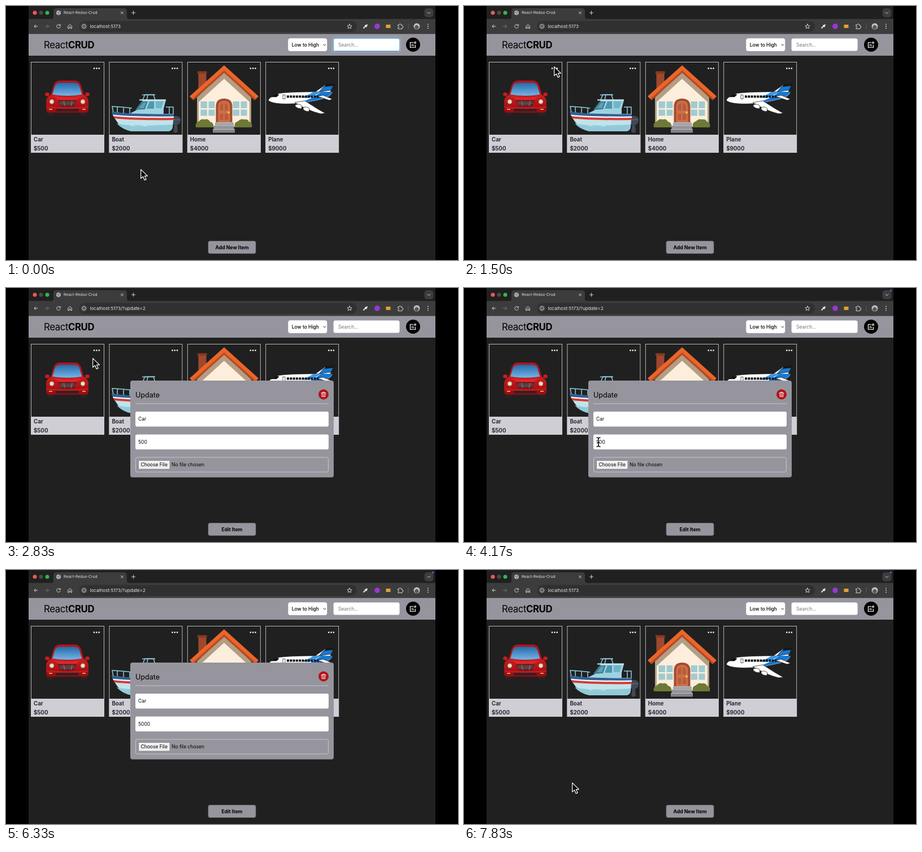
An HTML page that plays this animation: 800 by 450 pixels, repeating every 8 s.

```html
<!DOCTYPE html>
<html lang="en">
<head>
<meta charset="utf-8">
<title>React CRUD demo</title>
<style>
html, body { margin: 0; width: 100%; height: 100%; overflow: hidden; background: #000; }
svg { display: block; width: 100vw; height: 100vh; }
text { font-family: Inter, Roboto, sans-serif; font-size: 8.5px; white-space: pre; }
.label { font-size: 9.7px; font-weight: 700; fill: #2b2b36; }
.line { fill: none; stroke: #d2d3d5; stroke-width: 1; stroke-linecap: round; stroke-linejoin: round; }
.button { font-size: 8.7px; font-weight: 700; text-anchor: middle; }
</style>
</head>
<body>
<svg viewBox="0 0 800 450" xmlns="http://www.w3.org/2000/svg">
<defs>
  <linearGradient id="glass" x2="0" y2="1"><stop stop-color="#2569a8"/><stop offset="1" stop-color="#74b5e6"/></linearGradient>
  <linearGradient id="paint" x2="0" y2="1"><stop stop-color="#cf1c20"/><stop offset="1" stop-color="#970b11"/></linearGradient>
</defs>
<rect width="800" height="450"/>
<rect x="40" width="720" height="450" fill="#202020"/>

<g id="browser">
  <circle cx="51" cy="12" r="3.5" fill="#ee5a52"/><circle cx="62" cy="12" r="3.5" fill="#51484a"/><circle cx="73" cy="12" r="3.5" fill="#2fb944"/>
  <path d="M80 23Q84 23 84 19V9Q84 4 89 4H209Q214 4 214 9V19Q214 23 218 23H760V49.500H40V23Z" fill="#3c3c3c"/>
  <circle cx="93" cy="12" r="4" fill="#b9bcc0"/>
  <path d="M90 11q3 0 3 2t2 1M94 8.500q-1 2 2 3" fill="none" stroke="#4a4b4d"/>
  <text x="102" y="14.400" fill="#e3e3e3" style="font-size:6.750px">React-Redux-Crud</text>
  <path class="line" d="M203.500 10l4 4m0-4l-4 4M222.500 12h6m-3-3v6"/>
  <rect x="740.500" y="4" width="16" height="16" rx="5" fill="#3c3c3c"/>
  <path class="line" d="M746 11l2.500 2.500 2.500-2.500"/>
  <path class="line" d="M56 36H50m2.600-2.700L50 36l2.600 2.700"/>
  <path class="line" d="M69.500 36h6m-2.600-2.700L75.500 36l-2.600 2.700" style="stroke:#77787a"/>
  <path class="line" d="M95.800 34.200a3.300 3.300 0 1 0 .4 2.800M96.300 32.600v2.100h-2.100M110 35.500l3.200-2.800 3.200 2.800v4.200h-2v-2.600h-2.400v2.600h-2z"/>
  <rect x="129.500" y="26.500" width="491.500" height="19.500" rx="9.750" fill="#303030"/>
  <circle cx="138" cy="36" r="6.500" fill="#3c3c3c"/>
  <circle class="line" cx="138" cy="36" r="3.500"/><path class="line" d="M138 36v1.500m0-3.400v.1"/>
  <text id="url" x="148.500" y="39" fill="#e6e6e6" style="font-size:8.100px"></text>
  <path class="line" d="M608 32l1.200 2.700 2.900.3-2.200 1.900.7 2.900-2.600-1.500-2.600 1.500.7-2.900-2.200-1.900 2.900-.3z"/>
  <path d="M632.500 39.500l4.500-4.500" stroke="#d5e0ea" stroke-width="2"/><path d="M635.500 34l3 3m-1-2l2-2" stroke="#eee" stroke-width="2.200"/>
  <circle cx="657" cy="36" r="4.800" fill="#9a37d4"/>
  <rect x="672.500" y="33" width="8" height="6" fill="#dfa032"/>
  <path class="line" d="M694 33.500h2q0-2 1.500-2t1.500 2h2v2q2 0 2 1.500t-2 1.500v2h-7v-2.200q1.500-.1 1.500-1.400t-1.500-1.400z"/>
  <path d="M712 31v10" stroke="#5d5d5d"/>
  <circle cx="727" cy="36" r="5.500" fill="#bfc1c2"/><path d="M723 39q1-6 5-5l3 3q-2 5-5 4z" fill="#55595b"/>
  <path d="M747 32.500v.1m0 3.400v.1m0 3.400v.1" class="line" style="stroke-width:1.800"/>
</g>

<g id="header">
  <rect x="40" y="49.500" width="720" height="38.500" fill="#96959e"/>
  <text x="67" y="74.800" style="font-size:16.700px;letter-spacing:-.35px">React<tspan font-weight="700">CRUD</tspan></text>
  <rect x="499.300" y="57.300" width="69" height="22.700" rx="4" fill="#fff"/>
  <text x="505.800" y="71.800" font-weight="500">Low to High</text>
  <path d="M561.500 67.800l2.300 2.200 2.300-2.200" fill="none" stroke="#222"/>
  <g id="focus" fill="none">
    <rect x="578.700" y="56.700" width="118.600" height="23.600" rx="4.500" stroke="#c3d3e2" stroke-width="2.600"/>
    <rect x="579.200" y="57.200" width="117.600" height="22.600" rx="4" stroke="#2a71af" stroke-width="1.700"/>
  </g>
  <rect x="579.600" y="57.600" width="117" height="22" rx="3.700" fill="#fff"/>
  <text x="588" y="71.800" fill="#777">Search...</text>
  <circle cx="720.500" cy="68.500" r="12.500"/>
  <path d="M721 64.500h-5.500v9h9v-4.500M717.500 68h4m-4 2.500h5M724 62.500v5m-2.500-2.500h5" fill="none" stroke="#fff" stroke-width="1.200"/>
</g>

<g id="cards"></g>

<g id="car">
  <path d="M73 184h12v7q0 3-3 3h-6q-3 0-3-3zM132 184h12v7q0 3-3 3h-6q-3 0-3-3z" fill="#2d2224"/>
  <path d="M78 161l6-20q3-9 12-9h25q9 0 12 9l6 20z" fill="#b4141a"/>
  <path d="M82 157l4.500-15q2-6 9.500-6h25q7 0 9 6l4.500 15q-26 4-52.500 0z" fill="url(#glass)"/>
  <path d="M71 168q2-10 11-11 26 5 53 0 9 1 11 11v15q0 6-6 6H77q-6 0-6-6z" fill="url(#paint)"/>
  <path d="M84 160q24 4 49 0l-9 6H93z" fill="#d9282b"/>
  <ellipse cx="73" cy="156.500" rx="3.800" ry="3.200" fill="#c81d23"/><ellipse cx="144" cy="156.500" rx="3.800" ry="3.200" fill="#c81d23"/>
  <g fill="#f3dfba" stroke="#8c6e66"><circle cx="81" cy="169.500" r="4"/><circle cx="136" cy="169.500" r="4"/></g>
  <path d="M92 167.500h33l-5 10H97z" fill="#3c1d22"/>
  <path d="M94 170h29m-27.500 2.500h26m-25 2.500h23M102 168l2 9m11 0l2-9" stroke="#b09c94" stroke-width=".7"/>
  <path d="M72 179q36 4 73 0" fill="none" stroke="#d94440" stroke-width=".8"/>
  <rect x="88" y="182" width="41" height="5" rx="2.500" fill="#3c1d22"/>
  <path d="M76 183h6m53 0h6" stroke="#e89a4e" stroke-width="1.800"/>
</g>

<g id="boat">
  <path d="M293 198q2-4 10-3 6 1 6 7t-4 8h-2l1 13-5 2-3-3 2-11-5-3z" fill="#3f4857"/><path d="M295 202l13-1" stroke="#68717f"/>
  <path d="M190 189l-2-11q20 1 35 3M197 179v10m11-9v11m11-10v10M242 166l4-9h17M241 157.500h23m-13 0l-2 9m12-9l3 9M283 179h13v13m-7-13v12" fill="none" stroke="#8fcbdc" stroke-width="1.500"/>
  <path d="M218 191l14-7 10-17h41l-4 15v11z" fill="#9fd2e0"/>
  <path d="M229 184l11-15h11l-5 14z" fill="#3d7c95"/><path d="M235 181l8-10 5 0-4 10z" fill="#609fb4"/>
  <path d="M249 182l5-13h8v13z" fill="#4f96ae"/><path d="M265 169h14l-4 12h-10z" fill="#6fb5c8"/>
  <path d="M236 166.500h47" stroke="#d3edf2" stroke-width="2"/>
  <path d="M187 187q30 5 60 4h50l-2 23q-1 8-9 8h-64q-24-5-35-35z" fill="#c0e3ea"/>
  <path d="M196 208q24 6 99 2l-1 5q-1 7-8 7h-64q-16-3-26-14z" fill="#92cad8"/>
  <path d="M187 187q30 5 110 4.500v4.500q-72 2-108-3z" fill="#2f6094"/>
  <path d="M189 192.500q36 4 108 3v3q-70 1-107-3z" fill="#f4f8f8"/>
  <path d="M190 195q36 4 107 3l-.5 4q-70 1-105-3z" fill="#d63a35"/>
  <path d="M220 211l8 2m14-1l8 1" stroke="#d9f0f5"/>
</g>

<g id="house">
  <path d="M340.500 118h14v25l-14 12z" fill="#9f482e"/><path d="M339 115.500h16.500v4.500H339z" fill="#89391f"/>
  <path d="M338 162l48-46 48 46v52h-96z" fill="#b39d85"/>
  <path d="M341 170l45-41 45 41v44h-90z" fill="#fdeedc"/>
  <path d="M325 160l61-55 61 55-6 6-55-49-55 49z" fill="#ec6529"/>
  <path d="M329.500 164.500l56.500-50.500 56.500 50.500-2.500 2.500-54-48.500-54 48.500z" fill="#b64b24"/>
  <g id="panes" fill="#a0cbd0"><path d="M344.500 169h11.500v12h-11.500zM358.500 169h11v12h-11zM344.500 183.500h11.500v11h-11.500zM358.500 183.500h11v11h-11z"/></g>
  <use href="#panes" x="57"/>
  <path d="M371.500 207v-29q0-14 14.500-14t14.500 14v29z" fill="#a44a2e"/>
  <path d="M375.500 206v-27q0-11 10.500-11t10.500 11v27z" fill="#cb6f4b"/>
  <path d="M378.500 185v-5q0-8 6-8v13zm8.500-13q6 0 6 8v5h-6zM378.500 191h6v11h-6zm8.500 0h6v11h-6z" fill="#b95b3a"/>
  <circle cx="394" cy="188.500" r="2" fill="#ffc42f"/>
  <path d="M336 215q-2-8 5-10 4-6 11-4 6-2 9 4 7 1 6 10zM405 215q-2-9 6-11 4-5 10-3 7-1 9 4 7 2 5 10z" fill="#6d7935"/>
  <path d="M370 206h33v6h-33z" fill="#a4a5a8"/><path d="M367.500 211.500h36v7h-36z" fill="#929498"/><path d="M366 218h39v6.500h-39z" fill="#828488"/>
  <path d="M370 206.500h33m-35.500 5.500h36m-37.500 6.500h39" stroke="#c0c1c4"/>
</g>

<g id="plane" stroke="#111" stroke-width=".7" stroke-linejoin="round">
  <path d="M546 153l20-14 15-1-8 16z" fill="#fff"/>
  <path d="M566 139l15-1-2 4-16 2z" fill="#14171c"/><path d="M562 143l17-2-4 8-21 3z" fill="#1778d2"/>
  <path d="M464 167q5-9 20-12.500 28-3 72-2.500l22 1q-2 7-18 12-26 7-50 8-38 2-46-6z" fill="#fff"/>
  <path d="M514 172.500q26-6 44-20.500h20q-2 7-18 12-26 7-46 8.500z" fill="#1778d2" stroke="none"/>
  <path d="M536 163q13-5 22-11h-14q-8 6-22 10z" fill="#3a98e6" stroke="none"/>
  <path d="M497 160.500h66" fill="none" stroke="#111" stroke-width="3.800" stroke-dasharray="4 1.300"/>
  <path d="M469 161l9-5 5 1-4 4z" fill="#111"/><path d="M490 157.500h4v7h-4z" fill="#fff"/>
  <path d="M511 171l18-3 22 14 14 8-8 1q-24-6-46-20z" fill="#fff"/><path d="M551 160l10-2 17 7-6 2z" fill="#fff"/>
  <path d="M512 175q6-3 12 2l-1 5q-7 0-11-4zM526 180q6-3 11 2l-1 5q-7 0-10-4z" fill="#fff"/>
</g>

<g id="modal">
  <rect x="220" y="164" width="360" height="171.500" rx="4" fill="#96959e"/>
  <text x="229" y="193.800" style="font-size:12.600px">Update</text>
  <circle cx="562" cy="188.500" r="9" fill="#b11319"/>
  <path class="line" style="stroke:#fff;stroke-width:.9" d="M558 186h8m-5.500 0v-1.500h3v1.500m-4.700 0l.4 6.500h5.600l.4-6.500m-4.200 2v3m2 0v-3"/>
  <path d="M229 205h342" stroke="#c6c5cb"/>
  <rect x="229" y="219" width="342" height="26.500" rx="3" fill="#fff"/><text x="234" y="235.400">Car</text>
  <rect x="229" y="259.500" width="342" height="26.500" rx="3" fill="#fff"/><text id="price" x="234" y="276"></text>
  <path id="caret" d="M257.500 267.500v10.500" stroke="#111" stroke-width=".7"/>
  <rect x="229.500" y="300" width="341" height="26" rx="3" fill="none" stroke="#c6c5cb"/>
  <rect x="234.500" y="305.500" width="55.500" height="15.500" rx="1" fill="#efefef" stroke="#6d6d70" stroke-width=".7"/>
  <text x="238.500" y="316.300">Choose File</text><text x="293" y="316.300">No file chosen</text>
</g>

<rect x="358" y="416.500" width="84" height="22" rx="3" fill="#96959e" stroke="#777680" stroke-width=".7"/>
<text id="action" class="button" x="400" y="430.700"></text>
<circle id="indicator" cx="755.500" cy="4.500" r="1.800" fill="#376fc4"/>

<g id="pointer" stroke="#fff" stroke-linejoin="round">
  <path id="arrow" transform="translate(.7 .6) scale(.94)" d="M0 0v17l4-3.700 3 6.700 3-1.300-2.900-6.500h5.400z" stroke-width="1.300"/>
  <g id="beam" fill="none" stroke-linecap="round">
    <path d="M-3-8q3 0 3 2V6q0 2-3 2M3-8q-3 0-3 2M3 8q-3 0-3-2M-2 1h4" stroke-width="3"/>
    <path d="M-3-8q3 0 3 2V6q0 2-3 2M3-8q-3 0-3 2M3 8q-3 0-3-2M-2 1h4" stroke="#000" stroke-width="1.500"/>
  </g>
  <path id="hand" d="M-1.500 1q0-2 1.500-2t1.600 2l.8 5q2-1.500 3 .3 2-.8 2.600.8 2-.4 2.300 1.600l.2 4-1.500 4H2L-3 11q-2.500-2.500-1-3.500t3 1.500z" fill="#fff" stroke="#000" stroke-width=".9"/>
</g>
</svg>
<script>
const LOOP = 8000;
const OPEN = 2830, CLOSE = 7670;
const $ = id => document.getElementById(id);

const items = [['Car', 500], ['Boat', 2000], ['Home', 4000], ['Plane', 9000]];
$('cards').innerHTML = items.map(([name, price], i) => `
  <g transform="translate(${44.5 + i * 138.4} 99)">
    <rect y=".5" width="129" height="160" fill="#202020" stroke="#c9c9cc" stroke-width=".9"/>
    <rect x="-.4" y="129" width="129.800" height="32" fill="#cfced5"/>
    <path d="M111.500 11.500h.1m4.200 0h.1m4.200 0h.1" stroke="#fff" stroke-width="2.700" stroke-linecap="round"/>
    <text class="label" x="4.500" y="141.200">${name}</text>
    <text class="label" id="cost${i}" x="4.500" y="156.700">$${price}</text>
  </g>`).join('');

// [time, x, y, pointer shape]; each pose holds until the next
const poses = [
  [0, 238, 289, 'arrow'], [170, 230, 265], [330, 222, 246],
  [670, 205, 210], [830, 185, 160], [1000, 171, 127],
  [1330, 163, 113], [1500, 159, 107],
  [1830, 159, 109], [2000, 158, 112], [2170, 156, 116], [2330, 154, 121], [2500, 153, 124],
  [3000, 160, 138], [3170, 176, 165], [3330, 198, 203],
  [3500, 221, 243, 'arrow'], [3670, 234, 267, 'beam'], [3830, 238, 273],
  [4170, 238, 273], [4330, 252, 273], [4670, 255, 273], [5000, 0, 0, 'none'],
  [6670, 258, 280, 'beam'], [6830, 300, 330, 'arrow'], [7000, 355, 388],
  [7170, 394, 420, 'hand'], [7330, 400, 425], [7830, 191, 376.500, 'arrow']
];

const show = (id, on) => { $(id).style.display = on ? '' : 'none'; };
const between = (t, from, to) => t >= from && t < to;

function render(now) {
  const t = now % LOOP;
  const editing = between(t, OPEN, CLOSE);
  const past = poses.filter(p => p[0] <= t);
  const [, x, y] = past[past.length - 1];
  const shape = past.filter(p => p[3]).pop()[3];

  $('pointer').setAttribute('transform', `translate(${x} ${y})`);
  ['arrow', 'beam', 'hand'].forEach(id => show(id, id === shape));
  show('focus', t < 1000);
  show('modal', editing);
  show('caret', between(t, 4330, 5330) || between(t, 5830, 6330));
  $('caret').setAttribute('transform', `translate(${t < 5000 ? -6 : 0} 0)`);
  show('indicator', t >= 3500);
  $('url').textContent = 'localhost:5173' + (editing ? '/?update=2' : '');
  $('price').textContent = t < 5000 ? '500' : '5000';
  $('cost0').textContent = t < CLOSE ? '$500' : '$5000';
  $('action').textContent = editing ? 'Edit Item' : 'Add New Item';
}

const start = performance.now();
function tick() {
  render(Math.max(0, performance.now() - start));
  requestAnimationFrame(tick);
}
tick();
</script>
</body>
</html>
```
